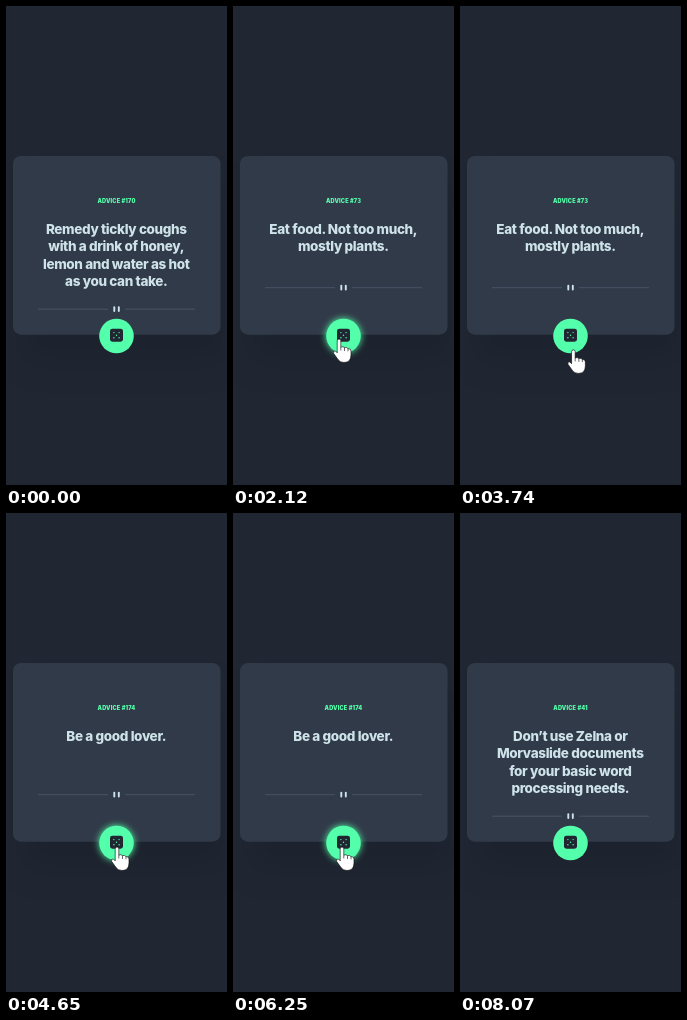
These frames come from a looping animation (221x479 px, 8.87 s). An HTML page:

```html
<!DOCTYPE html>
<html lang="en">
<head>
<meta charset="utf-8">
<title>Advice generator</title>
<style>
  html, body { margin: 0; height: 100%; overflow: hidden; background: #202733; }
  svg { display: block; width: 100vw; height: 100vh; }
  text { font-family: Inter, sans-serif; font-weight: 800; text-anchor: middle; }
  #label { font-size: 5.6px; font-weight: 900; letter-spacing: .15px; fill: #53ffaa; }
  #quote { font-size: 13.5px; letter-spacing: -.35px; fill: #cee3e9; }
  #card { fill: #313a48; filter: drop-shadow(8px 28px 16px rgba(0, 0, 0, .1)); }
  #button.glow { filter: drop-shadow(0 0 3.5px #53ffaa); }
  #cursor { fill: #fff; stroke: #000; stroke-width: .6; stroke-linejoin: round; }
</style>
</head>
<body>
<svg viewBox="0 0 221 479">
  <rect id="card" x="7" y="150" width="207.5" height="178.7" rx="8"/>
  <text id="label" x="110.5" y="197"/>
  <g id="quote"></g>
  <g id="divider">
    <path d="M32 0H102M119 0H189" stroke="#4f5d74" stroke-width=".7"/>
    <path d="M108.3-2.1V1.9M112.8-2.1V1.9" stroke="#cee3e9" stroke-width="1.9" stroke-linecap="round"/>
  </g>
  <circle id="button" cx="110.5" cy="330" r="17.3" fill="#53ffaa"/>
  <rect x="104" y="322.7" width="13" height="13" rx="2.4" fill="#202733"/>
  <path d="M107.9 326.6h0M113.1 326.6h0M110.5 329.2h0M107.9 331.8h0M113.1 331.8h0"
        stroke="#53ffaa" stroke-width="1.4" stroke-linecap="round"/>
  <g id="cursor">
    <circle id="click" r="12" fill="#ff0" fill-opacity=".47" stroke="none"/>
    <path id="hand" d="M-1.8 1.8Q-1.8 0 0 0T1.8 1.8V8.2Q4 7 5.5 8.6Q7.8 7.8 9 9.6Q12 9.3 12 12V16Q12 23.5 5 23.5Q1 23.5-1 20.5L-5.3 14.5Q-6.3 11.5-3.6 12L-1.8 13.8ZM1.8 8.2V11.5M5.5 8.6V12M9 9.6V12.3"/>
    <path id="arrow" d="M0 0V16L3.7 12.5 6.2 18.3 8.6 17.3 6.1 11.6H11.3Z"/>
  </g>
</svg>
<script>
const LOOP = 8870, STEP = 100;
const $ = id => document.getElementById(id);

// label and quote are the times at which each part of the advice appears
const rounds = [
  { label: 0, quote: 0, number: 170,
    lines: ['Remedy tickly coughs', 'with a drink of honey,', 'lemon and water as hot', 'as you can take.'] },
  { click: 1320, label: 2120, quote: 2120, number: 73,
    lines: ['Eat food. Not too much,', 'mostly plants.'] },
  { click: 4130, label: 4430, quote: 4650, number: 174,
    lines: ['Be a good lover.'] },
  { click: 6350, label: 6650, quote: 6850, number: 41,
    lines: ['Don’t use Zelna or', 'Morvaslide documents', 'for your basic word', 'processing needs.'] }
];

// The pointer slows down towards each place in turn
const enter = { x: 140, y: 394 };
const moves = [
  { from: 400, to: 1020, x: 106, y: 333 },
  { from: 2720, to: 3120, x: 140, y: 455 },
  { from: 3240, to: 3940, x: 111, y: 334 },
  { from: 5050, to: 5550, x: 124, y: 395 },
  { from: 5650, to: 6250, x: 109, y: 334 },
  { from: 7370, to: 7970, x: 191, y: 457 }
];
const leave = moves.at(-1).to + STEP;

const easeOut = p => 1 - (1 - p) ** 2;
const latest = (part, t) => rounds.findLast(r => r[part] <= t);

function pointer(t) {
  const i = moves.findLastIndex(m => m.from <= t);
  if (i < 0 || t >= leave) return null;
  const a = moves[i - 1] || enter, b = moves[i];
  const steps = Math.round((b.to - b.from) / STEP);
  const step = Math.floor((t - b.from) * steps / (b.to - b.from));
  const k = easeOut(Math.min(1, step / steps));
  return { x: a.x + (b.x - a.x) * k, y: a.y + (b.y - a.y) * k };
}

const hovers = p => Boolean(p) && Math.hypot(p.x - 110.5, p.y - 330) < 17.5;
const show = (id, on) => $(id).setAttribute('visibility', on ? 'visible' : 'hidden');

let current;
function setQuote(round) {
  if (round === current) return;
  current = round;
  $('quote').innerHTML = round.lines.map((line, i) =>
    `<text x="110.3" y="${228 + i * 17.4}">${line}</text>`).join('');
  $('divider').setAttribute('transform', `translate(0 ${round.lines.length > 2 ? 303.2 : 281.7})`);
}

function draw(now) {
  const t = now % LOOP;
  setQuote(latest('quote', t));
  $('label').textContent = 'ADVICE #' + latest('label', t).number;

  const p = pointer(t), over = hovers(p);
  $('button').classList.toggle('glow', over && hovers(pointer(t - STEP)));
  show('hand', over);
  show('arrow', p && !over);
  show('click', rounds.some(r => t >= r.click && t < r.click + 1.5 * STEP));
  if (p) $('cursor').setAttribute('transform', `translate(${p.x} ${p.y})`);
  requestAnimationFrame(draw);
}
requestAnimationFrame(draw);
</script>
</body>
</html>
```
